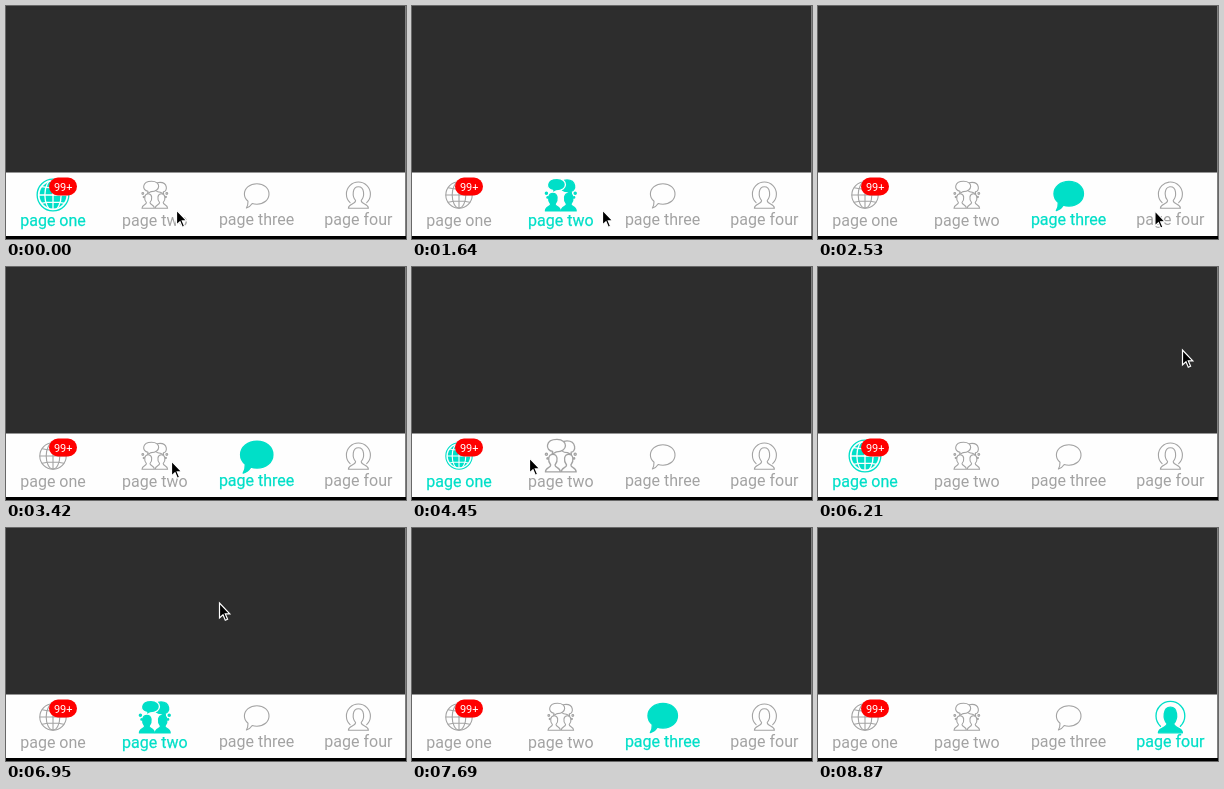
An HTML page for the animation above (9.32 s loop, 400 px wide and 233 px high).

```html
<!DOCTYPE html>
<html lang="en">
<head>
<meta charset="utf-8">
<style>
html, body { margin: 0; width: 100%; height: 100%; overflow: hidden; background: #2d2d2d; }
svg { display: block; width: 400px; height: 233px; font-family: Roboto, sans-serif; }
text { text-anchor: middle; }
.tab { --c: #a3a3a3; --fill: #fefefe; }
.tab.on { --c: #00dfc8; --fill: var(--c); }
.tab > text { font-size: 16px; fill: var(--c); }
.on > text { stroke: var(--c); stroke-width: .25; }
.icon { fill: var(--fill); stroke: var(--c); stroke-width: 1.1; stroke-linejoin: round; stroke-linecap: round; }
.on .gap { stroke: #fefefe; }
.icon .line { fill: none; }
</style>
</head>
<body>
<svg viewBox="0 0 400 233">
  <rect width="400" height="233" fill="#2d2d2d"/>
  <rect y="166.5" width="399" height="63.5" fill="#fefefe"/>
  <rect x="399" width="1" height="230" fill="#808080"/>
  <rect y="230" width="400" height="3" fill="#000"/>
  <g id="tabs"></g>
  <rect x="43" y="171.5" width="28" height="18" rx="9" fill="#f00"/>
  <text x="57.2" y="184.6" font-size="11" fill="#fff">99+</text>
  <path id="cursor" d="M.5 1V16L4 12.8L6.3 18.2L8.6 17.2L6.3 11.9H10.8Z"
    fill="#000" stroke="#fff" stroke-width="1.2"/>
</svg>
<script>
const LOOP = 9320, STEPS = 63;

const person = x => `<path d="M${x - 6.2} 13.3C${x - 6.2} 9.5 ${x - 1.8} 10 ${x - 1.8} 7.5
  C${x - 4.6} 4 ${x - 4} -1.3 ${x} -1.3S${x + 4.6} 4 ${x + 1.8} 7.5C${x + 1.8} 10 ${x + 6.2} 9.5 ${x + 6.2} 13.3Z"/>`;
const dots = side => `<circle cx="${side * 12}" cy="-1.5" r=".9"/><circle cx="${side * 11}" cy="2" r=".6"/>`;

// Icons are drawn around their own centre
const globe = `<circle r="11.2" stroke="none"/>
  <path class="line gap" d="M0-13V13M-13 0H13M-10.8-7.2Q0-4.8 10.8-7.2M-10.8 7.2Q0 4.8 10.8 7.2"/>
  <ellipse class="line gap" rx="6.8" ry="13"/>
  <circle class="line" r="13.2"/>`;
const people = `<path d="M5.2-12.6C13-12.6 13-3.6 8.6-3.2L8.8-1.2L5.5-2.8C-2.5-2.8-2.5-12.6 5.2-12.6Z"/>
  <path class="gap" d="M-3.2-13.8C-13.2-13.8-13-4.4-6.8-3.8L-7.2-1.6L-3.6-3.4C6-3.4 6.6-13.8-3.2-13.8Z"/>
  ${person(-6.6)}${person(6.6)}${dots(-1)}${dots(1)}`;
const bubble = `<path d="M.3-11.3C7.3-11.3 12.4-6.8 12.4-1S7.3 9.2.3 9.2C-1.5 9.2-3 9-4.4 8.5
  C-6 11-8 12.4-10.2 13C-9 11-8.5 8.5-8.6 6.2C-11 4.3-12.2 1.8-12.2-1C-12.2-6.8-6.7-11.3.3-11.3Z"/>`;
const portrait = `<path class="line" d="M-8.3 7.7A12 12 0 1 1 8.3 7.7"/>
  <path d="M-10 13.2C-10 8.5-2.8 9.5-2.8 5.5C-6.4 1.5-6.3-8.2 0-8.2S6.4 1.5 2.8 5.5C2.8 9.5 10 8.5 10 13.2Z"/>`;

const tabX = k => 47 + 101.8 * k;
const tabBox = document.getElementById("tabs");
tabBox.innerHTML = [["one", globe], ["two", people], ["three", bubble], ["four", portrait]]
  .map(([name, icon], k) => `<g class="tab"><g class="icon">${icon}</g>
    <text x="${tabX(k)}" y="${220 - k / 2}">page ${name}</text></g>`).join("");
const tabs = [...tabBox.children];
const cursor = document.getElementById("cursor");

const clamp = (v, lo, hi) => Math.min(hi, Math.max(lo, v));
const countFrom = (n, start, gap, max) => clamp(Math.floor((n - start) / gap) + 1, 0, max);

// Six taps go to the last tab and back, then three swipes go forward
function activeTab(n) {
  const taps = countFrom(n, 9, 4.2, 6), swipes = countFrom(n, 45, 5, 3);
  return 3 - Math.abs(taps - 3) + swipes;
}

function iconScale(n, k) {
  const [now, before, earlier] = [0, 1, 2].map(back => activeTab(n - back) === k);
  if (!now) return before ? 1.2 : 1;
  return !before ? 1 : earlier ? 1.2 : 1.31;
}

// Pointer stops: [step, x, y]
const stops = [[0, 170, 203], [2, 162, 203], [7, 162, 203], [11, 190, 203], [18, 345, 204],
  [23, 165, 193], [28, 50, 207], [30, 117, 190], [38, 349, 106], [42, 364, 82],
  [45, 8, 62], [46, 162, 74], [48, 264, 74], [51, 63, 74]];

function pointerAt(n) {
  const i = stops.findIndex(s => s[0] > n);
  if (i < 0) return null;
  const [a, b] = [stops[i - 1], stops[i]];
  const u = (n - a[0]) / (b[0] - a[0]), ease = u * u * (3 - 2 * u);
  return [1, 2].map(j => a[j] + (b[j] - a[j]) * ease);
}

function draw(n) {
  tabs.forEach((tab, k) => {
    tab.classList.toggle("on", activeTab(n) === k);
    tab.firstChild.setAttribute("transform", `translate(${tabX(k)} 189) scale(${iconScale(n, k)})`);
  });
  const p = pointerAt(n);
  cursor.setAttribute("visibility", p ? "visible" : "hidden");
  if (p) cursor.setAttribute("transform", `translate(${p})`);
}

const begin = performance.now();
function tick() {
  const t = (performance.now() - begin) % LOOP;
  draw(Math.min(STEPS - 1, Math.floor((t + 10) * STEPS / LOOP)));
  requestAnimationFrame(tick);
}
tick();
</script>
</body>
</html>
```
